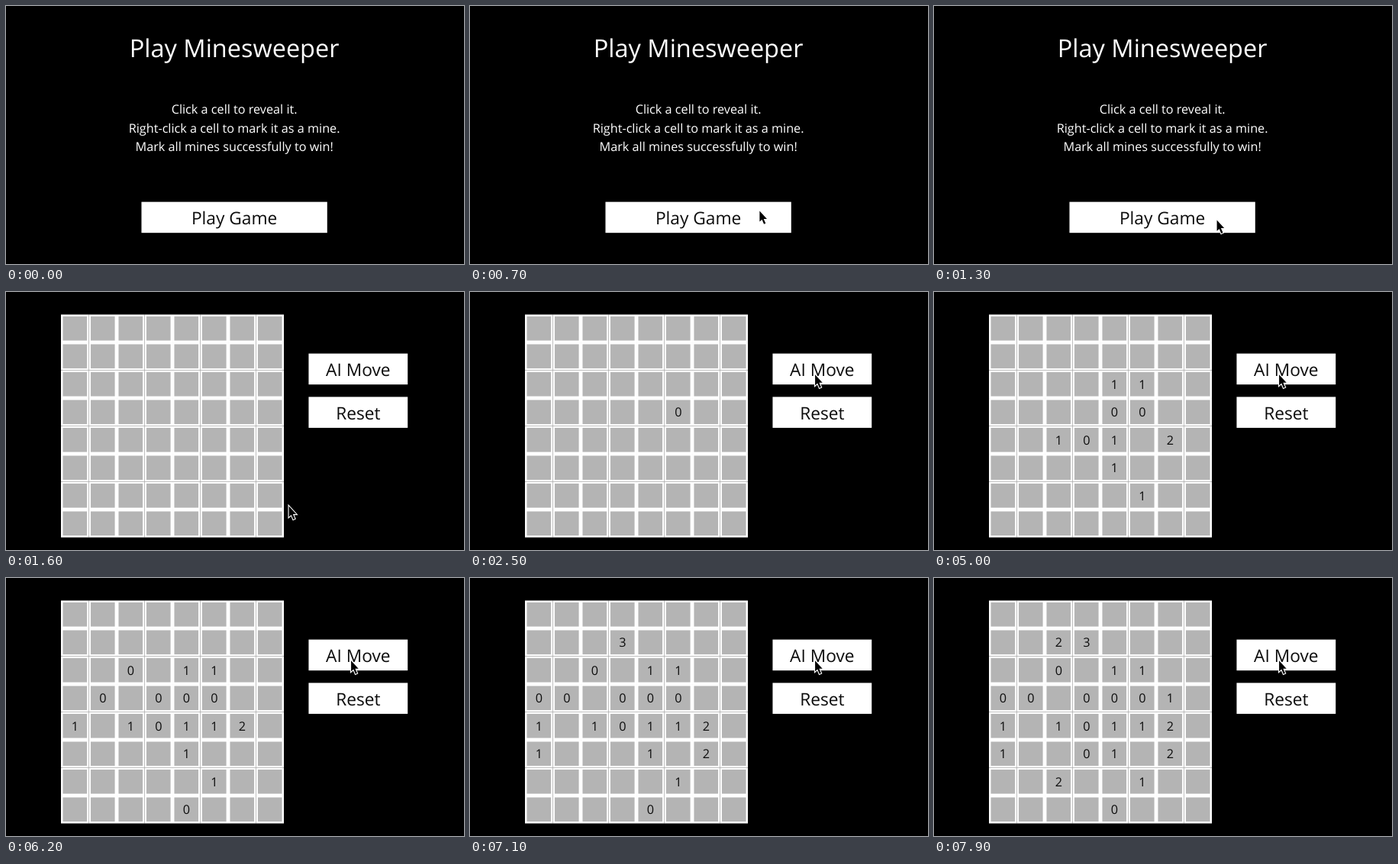
An HTML page that plays this animation: 600 px wide and 338 px high, repeating every 8 s.

```html
<!DOCTYPE html>
<html lang="en">
<head>
<meta charset="utf-8">
<title>Minesweeper</title>
<style>
  html, body { margin: 0; width: 100%; height: 100%; overflow: hidden; background: #000; }
  svg { display: block; width: 600px; height: 338px; }
  text { font-family: "Open Sans", sans-serif; text-anchor: middle; text-rendering: geometricPrecision; fill: #fff; }
  .small { font-size: 20px; }
  .medium { font-size: 28px; }
  .large { font-size: 40px; }
  .dark { fill: #0c0c0c; }
  .button { fill: #fff; }
  .cell { fill: #b4b4b4; stroke: #fff; stroke-width: 3; }
  .cursor { fill: #000; stroke: #fff; stroke-width: 2.2; paint-order: stroke; }
</style>
</head>
<body>
<svg viewBox="0 0 600 338">
  <!-- The game window is laid out at 600 x 400 and scaled down -->
  <g transform="translate(55.8 13.3) scale(.8111)">
    <g id="menu">
      <text class="large" x="300" y="66">Play Minesweeper</text>
      <text class="small" x="300" y="158">Click a cell to reveal it.</text>
      <text class="small" x="300" y="188">Right-click a cell to mark it as a mine.</text>
      <text class="small" x="300" y="218">Mark all mines successfully to win!</text>
      <rect class="button" x="150" y="300" width="300" height="50"/>
      <text class="medium dark" x="300" y="336">Play Game</text>
    </g>
    <g id="game" visibility="hidden">
      <g id="board"></g>
      <rect class="button" x="420" y="83" width="160" height="50"/>
      <text class="medium dark" x="500" y="119">AI Move</text>
      <rect class="button" x="420" y="153" width="160" height="50"/>
      <text class="medium dark" x="500" y="189">Reset</text>
    </g>
  </g>
  <path id="cursor" class="cursor" visibility="hidden"
    d="M1.4 2.4V16.6L4.5 13.7L7.1 19.8L9.3 18.8L6.7 12.9H11Z"/>
</svg>
<script>
const LOOP = 8000, GAME_START = 1600, SIZE = 8, CELL = 45, PAD = 20;

// "row column count" of the cells revealed at each time
const moves = {
  2500: '350', 3300: '441', 3500: '241 340', 3900: '430', 4100: '541',
  4300: '462', 4500: '251 651', 5000: '421', 5200: '740', 5400: '451',
  5600: '330', 5800: '220', 6000: '310', 6200: '401', 6400: '300 133',
  6900: '501', 7100: '562', 7300: '361', 7500: '530 622', 7900: '122'
};

// time, x, y of the pointer
const path = [
  [400, 440, 246], [500, 419, 254], [600, 396, 262], [700, 378, 266], [800, 370.7, 267],
  [1100, 370, 270], [1200, 369.5, 275], [1300, 369.2, 278.2],
  [1700, 381, 254], [1800, 411, 189], [1900, 439, 126], [2000, 448, 107],
  [2200, 449.7, 106.4], [2300, 450.7, 105.9]
];

const byId = id => document.getElementById(id);
const menu = byId('menu'), game = byId('game'), board = byId('board'), cursor = byId('cursor');

function add(tag, attrs, text = '') {
  const el = document.createElementNS('http://www.w3.org/2000/svg', tag);
  for (const name in attrs) el.setAttribute(name, attrs[name]);
  el.textContent = text;
  return board.appendChild(el);
}

const show = (el, on) => el.setAttribute('visibility', on ? 'inherit' : 'hidden');

for (let i = 0; i < SIZE * SIZE; i++) {
  const x = PAD + CELL * (i % SIZE) + 1.5;
  const y = PAD + CELL * Math.floor(i / SIZE) + 1.5;
  add('rect', { class: 'cell', x, y, width: CELL - 3, height: CELL - 3 });
}

const digits = Object.entries(moves).flatMap(([time, cells]) =>
  cells.split(' ').map(([row, col, count]) => ({
    time: +time,
    el: add('text', {
      class: 'small dark',
      x: PAD + CELL * col + 22.5,
      y: PAD + CELL * row + 30
    }, count)
  })));

function draw(now) {
  const t = now % LOOP;
  show(menu, t < GAME_START);
  show(game, t >= GAME_START);
  for (const { time, el } of digits) show(el, t >= time);
  const spot = path.filter(([time]) => time <= t).pop();
  show(cursor, spot);
  if (spot) cursor.setAttribute('transform', `translate(${spot[1]} ${spot[2]})`);
}

const start = performance.now();
function tick() {
  draw(performance.now() - start);
  requestAnimationFrame(tick);
}
draw(0);
requestAnimationFrame(tick);
</script>
</body>
</html>
```
